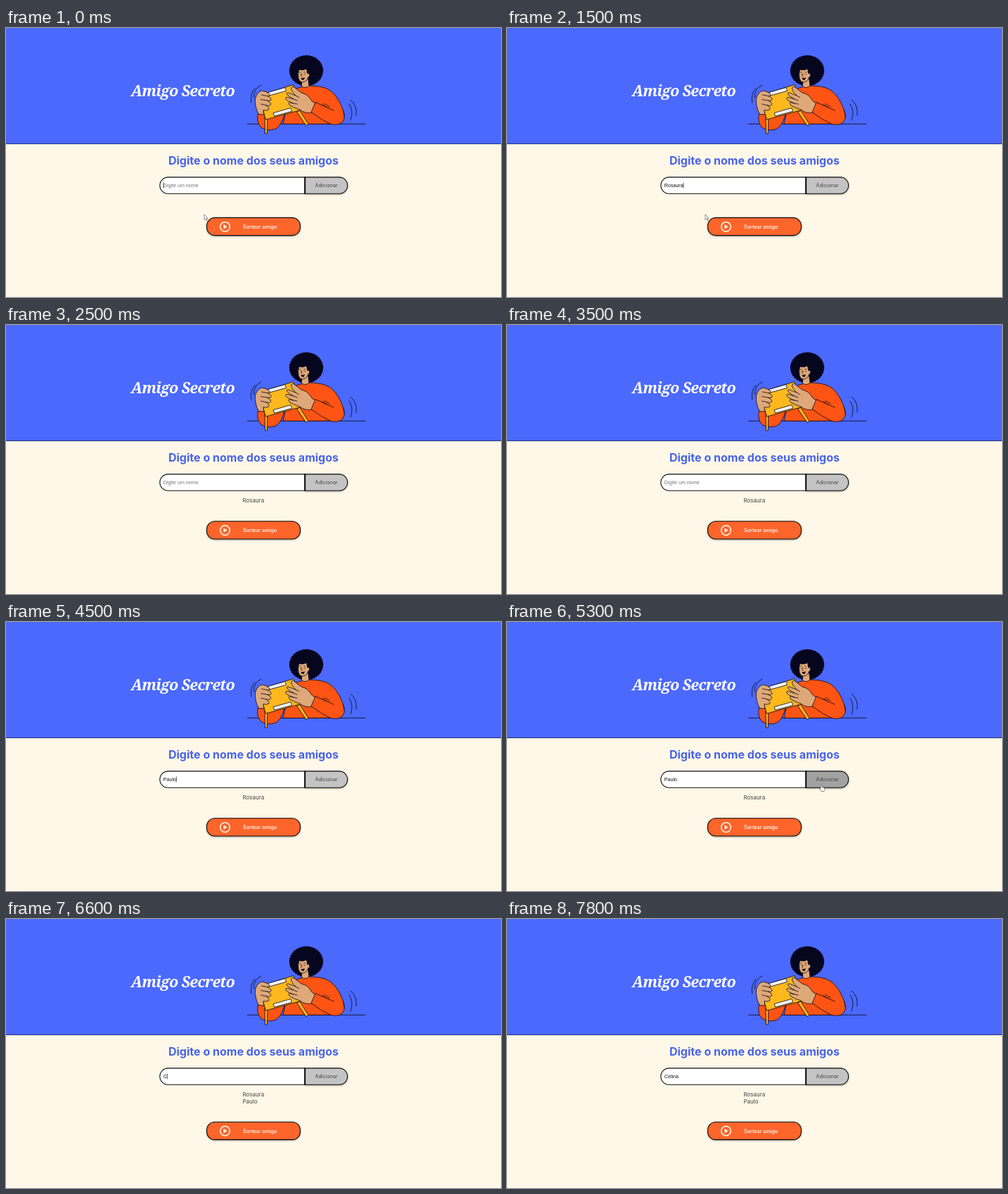
Recreate the animation shown at these times as an HTML page. Size 704 by 382 pixels, loop 8 s.

```html
<!DOCTYPE html>
<html lang="pt-BR">
<head>
<meta charset="utf-8">
<title>Amigo Secreto</title>
<style>
  html, body { margin: 0; width: 100%; height: 100%; overflow: hidden; background: #fff8e8; }
  svg { display: block; width: 100vw; height: 100vh; font-family: Inter, sans-serif; }
  .ink { stroke: #0a0a18; stroke-width: .8; stroke-linejoin: round; stroke-linecap: round; }
  .line { fill: none; }
  .skin { fill: #dfa878; }
  .shirt { fill: #ff5414; }
  .drum { fill: #fcb81c; }
  .paper { fill: #f7f5fa; }
  .box { stroke: #0b0b0b; stroke-width: 1.1; }
  .shadow { filter: drop-shadow(.6px 1.6px 1px #0005); }
  .field { font: 7.12px "Liberation Sans", Arial, sans-serif; white-space: pre; }
  .small { font-size: 7.2px; }
  .list { font-size: 8.05px; fill: #444; }
</style>
</head>
<body>
<svg viewBox="0 0 704 382" preserveAspectRatio="none">
  <path fill="#fff8e8" d="M0 0H704V382H0z"/>
  <path fill="#4b69fd" d="M0 0H704V165H0z"/>
  <path stroke="#26357e" d="M0 164.5H704"/>
  <text x="177.700" y="96.500" fill="#fff" font-family="'Noto Serif', serif" font-size="21.500" font-weight="900" font-style="italic" letter-spacing="-.7">Amigo Secreto</text>

  <g class="ink">
    <path class="line" d="M343.500 136.300H511M348.800 106Q346.500 93 354 85.500M352.500 99Q351.500 86 363 81M488 108Q495 118 490 131M490 102Q500 110 498 124"/>
    <!-- hair -->
    <ellipse cx="427" cy="60.500" rx="21.800" ry="19.500" fill="#07061f" stroke="#07061f" stroke-width="5" stroke-dasharray="0 3.600"/>
    <ellipse cx="427" cy="60.500" rx="22.600" ry="20.300" fill="#07061f" stroke="none"/>
    <!-- body -->
    <path class="shirt" d="M419 84Q410 86 404 91L394 136.300H447L470 136Q482 133 481 122C477 108 470 94 459 87.500Q450 82 431 82Z"/>
    <path class="skin" d="M420.500 73V83Q426 86.500 431 82L429.500 71Z"/>
    <path class="skin" d="M416.500 59Q414.800 66 416 72Q418 77.500 422 77Q428 76 429.500 70Q432.500 69 431.500 65.500Q430 63.500 428.800 65L427.500 58Q422 61 416.500 59Z"/>
    <path class="line" stroke-width=".6" d="M417.500 63.200l2-.5M423.500 62.600l2.500.4M418.500 65.800h1.500M423.800 65.800h1.800M421 65l-1.200 3.500 1.300.3"/>
    <path fill="#180c16" stroke="none" d="M419.300 70.800Q422 71.500 424.800 70Q424.600 73.800 422 74Q420 73.800 419.300 70.800Z"/>
    <!-- far sleeve -->
    <path class="shirt" d="M359 119Q355 134 363 141.500Q372 147 383 143.500Q391 140 396 123L378 120Z"/>
    <!-- drum -->
    <path class="drum" d="M368.300 126h3.500l-.5 24h-2.500zM414 119l3.600-2 12.400 19.500-3 2z"/>
    <path class="drum" d="M361.500 95L409 80.500Q415 99 419 116.500L369.500 130Q363 113 361.500 95Z"/>
    <path class="paper" d="M372.500 91.500L397 84.500L398.500 89.300L374.500 96ZM380.500 120.500L405 113.500L406.500 118.300L382 125Z"/>
    <!-- hands -->
    <path class="skin" d="M359 122Q353.500 111 354.500 100Q357 91 364 89Q371 90 374.500 93.500Q376 97 371.500 96.500Q377.500 99 377 102Q376 104.500 371.500 103Q377.500 106 376.500 109Q374.500 111.500 369.500 109.500Q375.500 113 373.500 116Q370 118 366 116.500Q366 121 367 123Z"/>
    <path class="line" d="M371.500 96.500L363.500 95M371.500 103L362.500 101.500M369.500 109.500L362.500 108"/>
    <path class="skin" d="M436 120Q425 122 418 116Q411 114 404 110Q400.500 107.500 403 105.500L409 107Q400 104 398 101Q397 98 400.500 98.500L409 101Q400 96 399 93Q400 90.500 403 92.500L412 96Q405 89 405.500 85Q407.500 81.500 411 85L420 92Q429 94 433 101Q435 105 440 107Z"/>
    <path class="line" d="M409 107l5 1M409 101l5 2M412 96l4.500 2.500"/>
    <!-- near sleeve -->
    <path class="shirt" stroke="none" d="M440 105.500L434 119.500Q449 131 462 136.500Q477 140 481 129L479 115L466 117Z"/>
    <path class="line" d="M466 117L440 105.500L434 119.500Q449 131 462 136.500Q477 140 481 129Q482 125 479 116M450 108.500l6 4M453 107.500l7 4.500"/>
  </g>

  <text x="352" y="194.300" text-anchor="middle" font-size="16.050" font-weight="700" fill="#4763ea">Digite o nome dos seus amigos</text>

  <path id="add" class="box shadow" d="M425.500 211.900H474a11.600 11.600 0 0 1 0 23.400H425.500z"/>
  <path class="box" fill="#fff" d="M425 211.900H230.500a11.700 11.700 0 0 0 0 23.400H425z"/>
  <path stroke="#0b0b0b" stroke-width="1.800" d="M425.200 211.400V235.800"/>
  <text class="small" x="455.600" y="226.300" text-anchor="middle" fill="#444">Adicionar</text>
  <text id="field" class="field" x="223.800" y="226"></text>
  <path id="caret" stroke="#111" stroke-width=".7" d="M0 219.400v8"/>
  <text id="name0" class="list" x="336.400" y="252.200"></text>
  <text id="name1" class="list" x="336.400" y="261.600"></text>

  <g id="draw">
    <rect class="box shadow" x="285.500" y="269.400" width="133" height="25.200" rx="11.500" fill="#fe652b"/>
    <circle cx="311.500" cy="282.200" r="6.800" fill="none" stroke="#fff9eb" stroke-width="1.500"/>
    <path fill="#fff9eb" d="M309.500 279v6.400l5-3.200z"/>
    <text class="small" x="337" y="285" font-weight="500" fill="#fff">Sortear amigo</text>
  </g>

  <g id="cursor" fill="#fff" stroke="#444" stroke-width=".6" stroke-linejoin="round">
    <path id="arrow" d="M0 0V7.400L1.800 5.900L3 8.700L4.200 8.200L3 5.500H5.200Z"/>
    <path id="hand" d="M-1 .7Q0 -.8 .8 .7V3.700L4 4.300Q5 4.700 4.800 6L4 9.500H0L-2.300 6.300Q-2.500 5 -1 5.700Z"/>
  </g>
</svg>
<script>
const LOOP = 8000;
const $ = id => document.getElementById(id);
const rounds = [
  { name: 'Rosaura', focus: -400, first: 600, step: 100, blur: 2200, added: 2300 },
  { name: 'Paulo', focus: 2800, first: 3700, step: 200, blur: 5200, added: 5400 },
  { name: 'Celina', focus: 5800, first: 6600, step: 120, blur: LOOP, added: LOOP }
];
// time, x, y of the pointer
const path = [
  [0, 282, 264.8], [1500, 282, 264.8], [2000, 449.8, 233], [2300, 449.8, 233],
  [2420, 380, 226], [5020, 380, 226], [5200, 447, 231], [5430, 447, 231], [5560, 385, 226], [LOOP, 385, 226]
];

function pointer(t) {
  const i = path.findIndex(p => p[0] > t);
  const [a, b] = [path[i - 1], path[i]];
  const u = (t - a[0]) / (b[0] - a[0]), e = u * u * (3 - 2 * u);
  return [a[1] + (b[1] - a[1]) * e, a[2] + (b[2] - a[2]) * e];
}
const show = (id, on) => $(id).setAttribute('visibility', on ? 'visible' : 'hidden');
const move = (id, x, y) => $(id).setAttribute('transform', `translate(${x} ${y})`);

function render(t) {
  const done = rounds.filter(r => r.added <= t);
  const r = rounds[done.length];
  const count = t < r.first ? 0 : Math.min(r.name.length, Math.floor((t - r.first) / r.step) + 1);
  const field = $('field');
  field.textContent = count ? r.name.slice(0, count) : 'Digite um nome';
  field.setAttribute('fill', count ? '#111' : '#757575');

  // the blink restarts with every key
  const last = count ? r.first + (count - 1) * r.step : r.focus;
  show('caret', t >= r.focus && t < r.blur && (t - last) % 1000 < 500);
  move('caret', 224.1 + (count ? field.getComputedTextLength() : 0), 0);

  for (const i of [0, 1]) $('name' + i).textContent = done[i] ? done[i].name : '';
  move('draw', 0, done.length * 9.4);

  const [x, y] = pointer(t);
  const inRow = y > 211 && y < 236, over = inRow && x > 425;
  move('cursor', x, y);
  show('arrow', !inRow);
  show('hand', over);
  $('add').setAttribute('fill', over ? '#a2a2a2' : '#c4c4c4');
}

const start = performance.now();
function tick() {
  render((performance.now() - start) % LOOP);
  requestAnimationFrame(tick);
}
tick();
</script>
</body>
</html>
```
